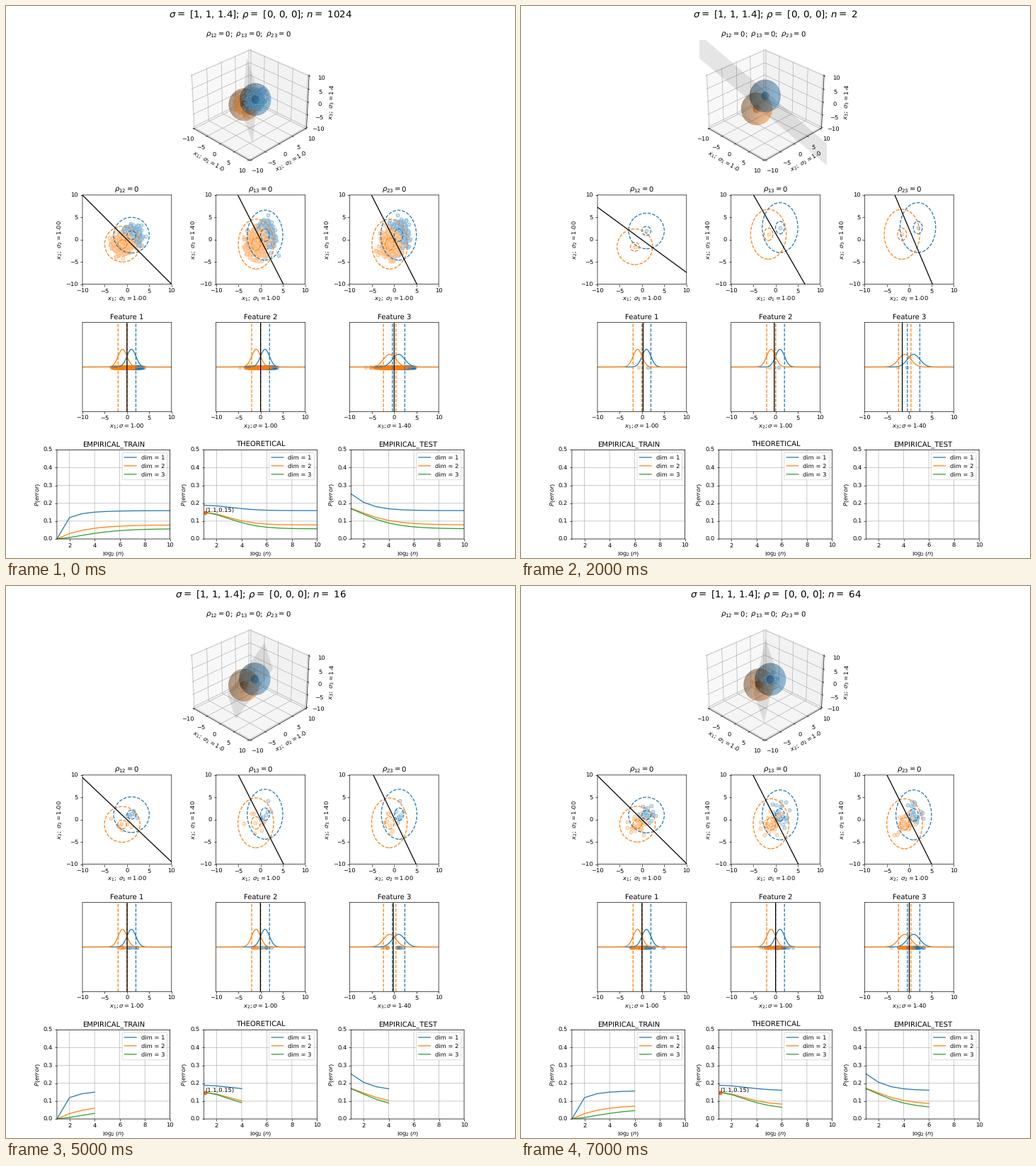
Write a matplotlib script that moves like this. It is 719x779 px and loops after 8 s.

```python
import numpy as np
import matplotlib.pyplot as plt
from matplotlib.animation import ArtistAnimation
from matplotlib.colors import to_rgb
from matplotlib.patches import Ellipse
from mpl_toolkits.mplot3d.art3d import Poly3DCollection

W, H, DPI = 719, 779, 60
BLUE, ORANGE, GREEN = "tab:blue", "tab:orange", "tab:green"
SIGMA = np.array([1, 1, 1.4])
PAIRS = [(0, 1), (0, 2), (1, 2)]
STAGES = [1024, 0, 2, 4, 8, 16, 32, 64]
TICKS = range(-10, 11, 5)

# Errors of the class means with two samples; they shrink as 2 / n.
PAIR_DRIFT = np.array([(0, 0.95, 1.7), (-0.6, -0.6, 2.2)])
BALL_DRIFT = np.array([(-1.8, -0.1, 0.5), (0.1, -1, -1.1)])
CUT_DRIFT = np.array([0.25, -0.3, -1.55])

# Error curves per dimension: start, limit, time scale, power.
CURVES = {
    "EMPIRICAL_TRAIN": [(0, 0.159, 0.61, 0.67), (0, 0.079, 2.1, 1),
                        (0, 0.057, 3.5, 1.5)],
    "THEORETICAL": [(0.189, 0.159, 3, 1.9), (0.15, 0.079, 2.8, 1.8),
                    (0.15, 0.057, 3, 1.7)],
    "EMPIRICAL_TEST": [(0.253, 0.159, 1.4, 1.05), (0.172, 0.079, 2.4, 1.25),
                       (0.17, 0.057, 2.5, 1.25)],
}

# Smooth placement without pixel snapping.
plt.rcParams.update({"path.snap": False, "text.hinting": "none",
                     "axes.labelpad": 2.4})
fig = plt.figure(figsize=(W / DPI, H / DPI), dpi=DPI)
rng = np.random.default_rng(4)


def add_axes(x, y, w, h, **kw):
    """Axes placed in pixels from the top left corner."""
    return fig.add_axes([x / W, 1 - (y + h) / H, w / W, h / H], **kw)


def samples(count, mean, sigma):
    """Normal points whose average is exactly the mean."""
    z = rng.normal(size=(count, len(mean)))
    return np.array(mean) + (z - z.mean(axis=0)) * sigma


def class_means(n, drift):
    return np.array([[1], [-1]]) + drift * 2 / n


def tint(color, amount):
    return 1 - amount * (1 - np.array(to_rgb(color)))


def dots(ax, *coords, color, **kw):
    """Light discs with a darker rim."""
    return ax.scatter(*coords, facecolors=[tint(color, 0.35)],
                      edgecolors=[tint(color, 0.65)], alpha=0.65,
                      linewidths=1, **kw)


def bell(x, mean, s):
    return np.exp(-((x - mean) / s) ** 2 / 2) / (s * np.sqrt(2 * np.pi))


def make_space():
    ax = add_axes(252, 48, 180, 180, projection="3d", computed_zorder=False)
    ax.view_init(30, -45)
    ax.set(xticks=TICKS, yticks=TICKS, zticks=TICKS)
    ax.set_xlabel(r"$x_1;\ \sigma_1=1.0$")
    ax.set_ylabel(r"$x_2;\ \sigma_2=1.0$")
    ax.set_zlabel(r"$x_3;\ \sigma_3=1.4$")
    ax.set_title(r"$\rho_{12}=0;\ \rho_{13}=0;\ \rho_{23}=0$")
    return ax


def make_pair(col, i, j):
    ax = add_axes(108 + 188.7 * col, 266.8, 125.8, 125.8)
    ax.set(xlim=(-10, 10), ylim=(-10, 10), xticks=TICKS, yticks=TICKS)
    ax.set_xlabel(rf"$x_{i + 1};\ \sigma_{i + 1}={SIGMA[i]:.2f}$")
    ax.set_ylabel(rf"$x_{j + 1};\ \sigma_{j + 1}={SIGMA[j]:.2f}$")
    ax.set_title(rf"$\rho_{{{i + 1}{j + 1}}}=0$")
    return ax


def make_feature(col):
    ax = add_axes(108 + 188.7 * col, 446.6, 125.8, 125.8)
    ax.set(xlim=(-10, 10), ylim=(-1, 1), xticks=TICKS, yticks=[])
    s = SIGMA[col]
    x = np.linspace(-10, 10, 300)
    for mean, color in ((1, BLUE), (-1, ORANGE)):
        ax.plot(x, bell(x, mean, s), color=color)
        for edge in (mean - s, mean + s):
            ax.plot([edge, edge], [-1, 1], "--", color=color)
    ax.set_xlabel(rf"$x_{col + 1};\sigma={s:.2f}$")
    ax.set_title(f"Feature {col + 1}")
    return ax


def make_error(col, name):
    ax = add_axes(71.9 + 207.7 * col, 626.3, 159.8, 125.8)
    ax.set(xlim=(1, 10), ylim=(0, 0.5), xticks=range(2, 11, 2))
    ax.grid(True)
    for dim, color in enumerate((BLUE, ORANGE, GREEN), 1):
        ax.plot([], [], color=color, label=f"dim = {dim}")
    ax.legend(loc="upper right")
    ax.set_xlabel(r"$\log_2(n)$")
    ax.set_ylabel("$P(error)$")
    ax.set_title(name)
    return ax


def ellipsoid(ax, center, scale, color, zorder):
    u, v = np.meshgrid(np.linspace(0, 2 * np.pi, 31), np.linspace(0, np.pi, 21))
    unit = (np.cos(u) * np.sin(v), np.sin(u) * np.sin(v), np.cos(v))
    xyz = [c + scale * s * a for c, s, a in zip(center, SIGMA, unit)]
    return ax.plot_surface(*xyz, color=color, alpha=0.27, linewidth=0,
                           zorder=zorder)


def plane(ax, n):
    """Separating plane, turning upright and closing in as n grows."""
    angle = np.radians(max(85 - 500 / n, -40))
    length = min(150, 37 + 1600 / n ** 2)
    along = length * np.array([np.cos(angle), np.sin(angle)])
    across = (abs(n - 4) / n + 0.1) * np.array([7, -20])
    corners = [along - across, along + across,
               -along + across, -along - across]
    # Screen offsets in pixels to points facing the viewer.
    verts = [(x / 7.7, x / 7.7, y / 3.5) for x, y in corners]
    quad = Poly3DCollection([verts], facecolor=(0, 0, 0, 0.1),
                            edgecolor="none", zorder=3)
    ax.add_collection3d(quad)
    return quad


def draw_space(ax, n):
    art = [plane(ax, n)]
    means = class_means(n, BALL_DRIFT)
    for center, color, z in zip(means, (BLUE, ORANGE), (4, 2)):
        pts = samples(n // 2, center, SIGMA)
        art.append(dots(ax, *pts.T, color=color, s=20, zorder=z - 0.2))
        art += [ellipsoid(ax, center, k, color, z) for k in (1, 4)]
    return art


def draw_pairs(axes, n):
    art = []
    means = class_means(n, PAIR_DRIFT)
    for mean, color in zip(means, (BLUE, ORANGE)):
        pts = samples(n // 2, mean, SIGMA)
        for ax, (i, j) in zip(axes, PAIRS):
            art.append(dots(ax, pts[:, i], pts[:, j], color=color))
            for k in (1, 4):
                ring = Ellipse((mean[i], mean[j]), 2 * k * SIGMA[i],
                               2 * k * SIGMA[j], fill=False, ls="--", lw=1.5,
                               edgecolor=color, zorder=2)
                art.append(ax.add_patch(ring))
    # Linear discriminant; the variances are learned from unity.
    variance = 1 + (SIGMA ** 2 - 1) * (1 - 2 / n)
    weight = (means[0] - means[1]) / variance
    middle = means.mean(axis=0)
    y = np.array([10, -10])
    for ax, (i, j) in zip(axes, PAIRS):
        x = middle[i] - weight[j] / weight[i] * (y - middle[j])
        art += ax.plot(x, y, color="k")
    return art


def draw_features(axes, n):
    art = []
    swing = np.cos(2 * np.pi * (np.log2(n) - 1) / 3) * 2 / n
    for ax, cut, s in zip(axes, CUT_DRIFT * swing, SIGMA):
        for sign, color in ((1, BLUE), (-1, ORANGE)):
            x = samples(n // 2, [cut + sign], s)[:, 0]
            art.append(ax.scatter(x, 0 * x, color=color, alpha=0.3))
        art += ax.plot([cut, cut], [-1, 1], color="k")
    return art


def draw_errors(axes, n):
    k = np.arange(1, np.log2(n) + 1)
    art = []
    for ax, curves in zip(axes, CURVES.values()):
        for (start, limit, scale, power), color in zip(
                curves, (BLUE, ORANGE, GREEN)):
            fade = np.exp(-((k - 1) / scale) ** power)
            art += ax.plot(k, limit + (start - limit) * fade, color=color)
    mid = axes[1]
    art.append(mid.scatter(1.1, 0.148, color="#f8650c", zorder=3))
    art.append(mid.text(1.1, 0.15, "(1.1,0.15)"))
    return art


space = make_space()
pairs = [make_pair(c, i, j) for c, (i, j) in enumerate(PAIRS)]
features = [make_feature(c) for c in range(3)]
errors = [make_error(c, name) for c, name in enumerate(CURVES)]


def stage(n):
    title = r"$\sigma=$ [1, 1, 1.4]; $\rho=$ [0, 0, 0]; $n=$ " + str(n)
    art = [fig.text(0.5, 1 - 16 / H, title, size=16, ha="center")]
    if n:
        art += draw_space(space, n)
        art += draw_pairs(pairs, n) + draw_features(features, n)
    if n > 2:
        art += draw_errors(errors, n)
    return art


frames = [stage(n) for n in STAGES]
# The box is a little wider than the outer ticks.
limits = (-10 * 25 / 24, 10 * 25 / 24)
space.set(xlim=limits, ylim=limits, zlim=limits)
anim = ArtistAnimation(fig, frames, interval=1000, repeat=True, repeat_delay=0)
plt.show()
```
